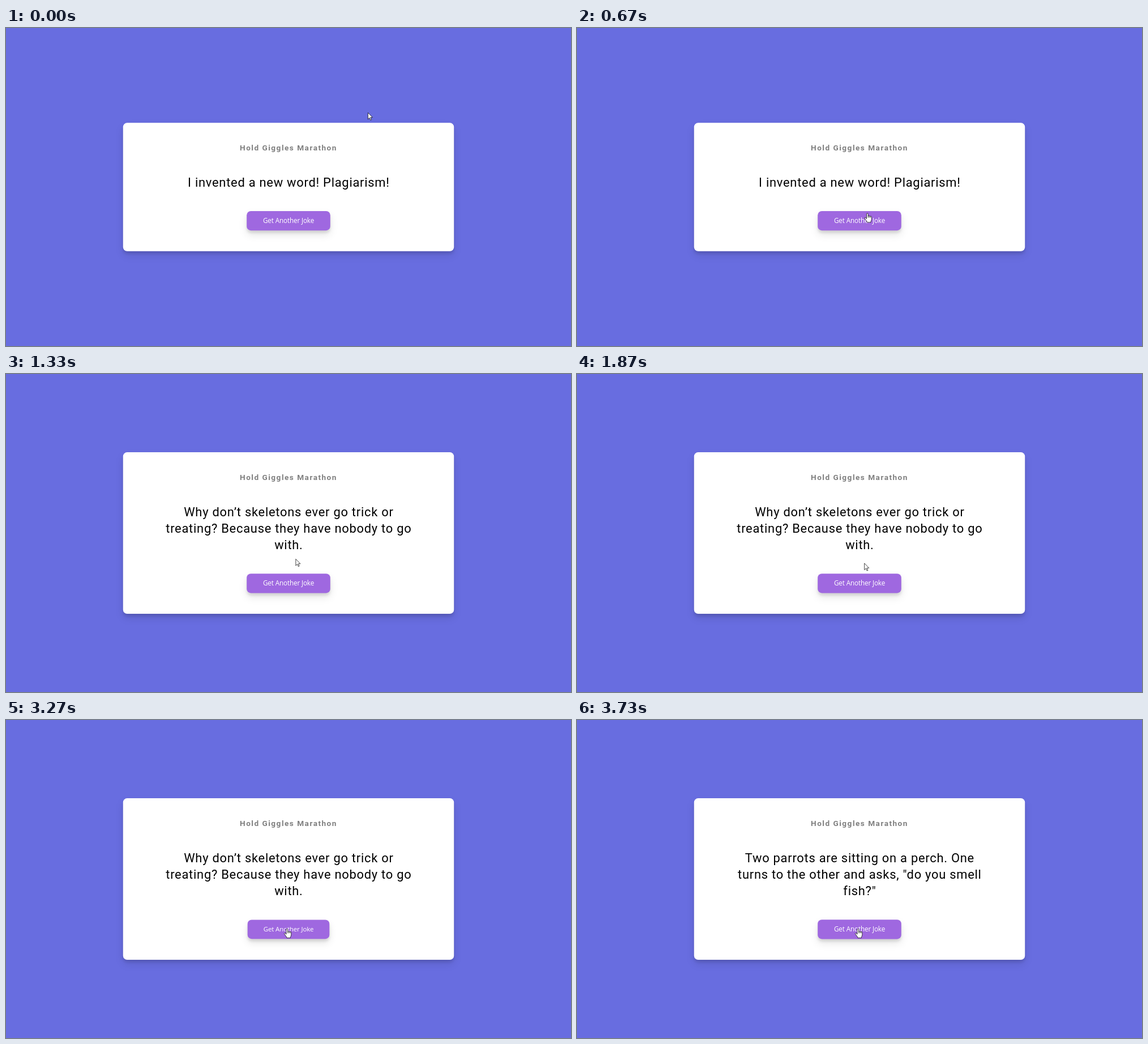
An HTML page for the animation above (5.39 s loop, 998 by 561 pixels).

```html
<!DOCTYPE html>
<html lang="en">
<head>
<meta charset="utf-8">
<title>Joke card</title>
<style>
  html, body { margin: 0; width: 100%; height: 100%; overflow: hidden; background: #686de0; }
  /* A 1366 x 768 page, shown at the width of the stage. */
  #page {
    position: absolute; left: 0; top: 0; width: 1366px; height: 768px;
    transform: scale(.7306); transform-origin: 0 0;
    display: flex; align-items: center; justify-content: center;
    font-family: Roboto, sans-serif; text-align: center;
  }
  #card, #button {
    border-radius: 10px;
    box-shadow: 0 10px 20px rgba(0, 0, 0, .1), 0 6px 6px rgba(0, 0, 0, .1);
  }
  #card { box-sizing: border-box; width: 800px; padding: 50px 20px; background: #fff; }
  h3 { margin: 0; font-size: 18.72px; line-height: 23px; letter-spacing: 2px; opacity: .5; }
  #joke {
    position: relative; left: .5px; top: 1px; margin: 50px 0;
    font-size: 30px; line-height: 40px; letter-spacing: 1px; white-space: pre;
  }
  #button {
    width: 202px; height: 47px; margin: 0 auto;
    background: #9f68e0; color: #fff;
    font: 16px/47px "Open Sans", "Noto Sans", sans-serif; letter-spacing: -.17px;
  }
  svg { position: absolute; left: 0; top: 0; }
</style>
</head>
<body>
<div id="page">
  <div id="card">
    <h3>Hold Giggles Marathon</h3>
    <div id="joke"></div>
    <div id="button">Get Another Joke</div>
  </div>
</div>
<svg width="998" height="561" viewBox="0 0 998 561">
  <g id="cursor" fill="#fff" stroke="#000" stroke-linejoin="round">
    <path id="arrow" d="M.5 .5V16.5L4.2 13 6.6 18.6 9 17.6 6.6 12H11.6Z"/>
    <g id="hand" transform="translate(0 .7)">
      <path d="M0 2.3a1.8 1.8 0 0 1 3.6 0V7.6a1.45 1.3 0 0 1 2.9 .4a1.45 1.3 0 0 1 2.9 .6a1.3 1.3 0 0 1 2.6 .8V14.5c0 3.2-1.7 4-1.9 7.8H1.2C.9 18.6-2.4 16.8-4.6 12.7c-.8-1.7 1-2.8 2.2-1.5L0 13.8Z"/>
      <path fill="none" d="M3.6 7.6v3.6M6.5 8v3.2M9.4 8.6v2.6"/>
    </g>
  </g>
</svg>
<script>
const LOOP = 5390;
const $ = id => document.getElementById(id);

const jokes = [
  [0, "I invented a new word! Plagiarism!"],
  [20, "Why don’t skeletons ever go trick or\ntreating? Because they have nobody to go\nwith."],
  [56, "Two parrots are sitting on a perch. One\nturns to the other and asks, \"do you smell\nfish?\""]
];
// Pointer stops: tick, x, y
const stops = [
  [0, 639, 149], [8, 513, 328], [9, 512.2, 326.5], [10, 511.5, 326],
  [21, 511.5, 326], [25, 508, 331.5], [27, 508, 331.5], [34, 495, 367.5]
];
const presses = [16, 49];

// The screen refreshes 15 times a second, on whole hundredths.
function tickAt(ms) {
  const k = Math.floor(ms * .015 + .06);
  return Math.round(k * 20 / 3) * 10 > ms ? k - 1 : k;
}

function pointerAt(tick) {
  const next = stops.findIndex(s => s[0] > tick);
  if (next < 0) return stops[stops.length - 1].slice(1);
  const [t0, x0, y0] = stops[next - 1], [t1, x1, y1] = stops[next];
  const u = (tick - t0) / (t1 - t0), e = u * u * (3 - 2 * u);
  return [x0 + (x1 - x0) * e, y0 + (y1 - y0) * e];
}

function show(el, on) { el.style.display = on ? "" : "none"; }

function render(ms) {
  const tick = tickAt(ms);
  const text = jokes.filter(j => j[0] <= tick).pop()[1];
  if ($("joke").textContent !== text) $("joke").textContent = text;
  $("button").style.transform = presses.includes(tick) ? "scale(.98)" : "none";

  const [x, y] = pointerAt(tick);
  const onButton = y >= (tick < 19 ? 323 : 352);
  show($("hand"), onButton);
  show($("arrow"), !onButton);
  $("cursor").setAttribute("transform", `translate(${x} ${y}) scale(.7306)`);
}

const start = performance.now();
function frame() {
  render((performance.now() - start) % LOOP);
  requestAnimationFrame(frame);
}
frame();
</script>
</body>
</html>
```
